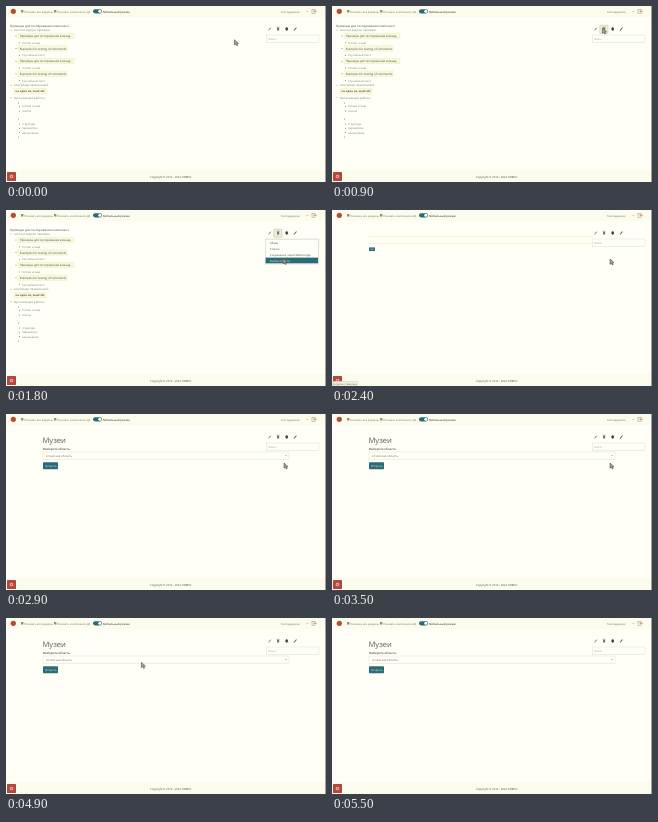
Animation of 320x176 px, one loop 5.7 s. Source, as an HTML page:

```html
<!DOCTYPE html>
<html lang="ru">
<head>
<meta charset="utf-8">
<title>Выбор области</title>
<style>
  html, body { margin: 0; width: 100%; height: 100%; overflow: hidden; background: #fffff8; }
  svg { display: block; width: 100vw; height: 100vh; }
  text { font-family: "Open Sans", "Noto Sans", sans-serif; text-rendering: geometricPrecision; }
</style>
</head>
<body>
<svg id="stage" viewBox="0 0 320 176"></svg>
<script>
const stage = document.getElementById('stage');
const INK = '#4c4c46', SOFT = '#74745f', GREEN = '#71886b', TEAL = '#2b6b76', EDGE = '#dedec2';
const PAPER = '#fffffa', BAND = '#fcfcee';

const text = (x, y, label, fill = INK, size = 2.9, weight = 400) =>
  `<text x="${x}" y="${y}" fill="${fill}" font-size="${size}" font-weight="${weight}">${label}</text>`;
const rect = (x, y, w, h, fill, stroke = 'none', rx = 0) =>
  `<rect x="${x}" y="${y}" width="${w}" height="${h}" rx="${rx}" fill="${fill}" stroke="${stroke}" stroke-width=".5"/>`;
const dot = (x, y, r, fill) => `<circle cx="${x}" cy="${y}" r="${r}" fill="${fill}"/>`;
const path = (d, stroke, width = .6, fill = 'none') =>
  `<path d="${d}" fill="${fill}" stroke="${stroke}" stroke-width="${width}"/>`;
const group = (id, content) => `<g id="${id}">${content}</g>`;

function header() {
  return rect(0, 0, 319, 11, BAND) + dot(7.3, 5.3, 2.6, '#b84b32') +
    rect(15, 4, 2.4, 2.5, '#8d9868') + text(18, 6.6, 'Показать все разделы', SOFT, 2.7) +
    rect(48, 4, 2.4, 2.5, '#8d9868') + text(51, 6.6, 'Показать компоненты ДЗ', SOFT, 2.7) +
    rect(87, 3.2, 9, 4.2, TEAL, 'none', 2.1) + dot(93.8, 5.3, 1.5, PAPER) +
    text(97, 6.6, 'Мобильный режим', INK, 2.7, 600) +
    text(275, 6.6, 'Техподдержка', SOFT, 2.7) + path('M300.5 5l.8.8.8-.8', SOFT, .4) +
    rect(306, 3.4, 3, 3.8, 'none', '#b5805a') + path('M307.5 5.3h3.2', '#b5805a', .8) +
    rect(319, 0, 1, 176, '#a2a298');
}

function footer() {
  return rect(0, 164, 319, 12, BAND) + rect(1, 166, 9, 9, '#b5473f', 'none', .6) +
    dot(5.5, 170.5, 1.8, '#e2b2a5') + dot(5.5, 170.5, .7, '#b5473f') +
    text(144, 171.8, 'Copyright © 2014 - 2024 ЛИВРО', INK, 2.75);
}

function outline() {
  const ru = 'Примеры для тестирования команд,', en = 'Examples for testing of commands';
  const samples = [[ru, 'Готово и ещё'], [en, 'Случайный текст'], [ru, 'Готово и ещё'], [en, 'Случайный текст']];
  const bullet = (y, label) => dot(13.5, y - 1, .5, SOFT) + text(16, y, label, GREEN, 2.8);
  const heading = (y, label) => path(`M4.3 ${y - 1.5}l.8.8.8-.8`, SOFT, .4) + text(8, y, label, GREEN, 2.95);
  const marked = (y, width, x = 12) => rect(x, y - 3.8, width, 5.4, '#f8f8df', '#efefb4');
  let out = text(4, 21.2, 'Примеры для тестирования компонент', '#66706b', 2.95, 600) +
    heading(25.2, 'контент внутри примера');
  samples.forEach(([title, note], i) => {
    const y = 31 + i * 12.6;
    out += marked(y, i % 2 ? 49 : 56) + dot(10, y - 1, .5, SOFT) +
      text(13.7, y, title, INK, 2.9) + bullet(y + 6.8, note);
  });
  out += heading(80.3, 'контейнер примечаний') +
    marked(86.4, 32, 8) + text(9.5, 86.3, 'на один из, занятий', INK, 2.85, 600) +
    heading(92.6, 'Организация работы') + bullet(101.2, 'Готово и ещё') + bullet(106, 'список');
  ['структура', 'параметры', 'назначение'].forEach((label, i) => out += bullet(119 + i * 4.3, label));
  [97, 113, 131].forEach(y => out += dot(12.5, y, .5, SOFT));
  return out;
}

function tools() {
  return rect(260.5, 29, 52.5, 7.6, PAPER, EDGE) + text(262, 34, 'Поиск', '#9b9b87', 2.7) +
    path('M262.7 24.3l2-2.6', '#65655a', .9) +
    rect(271, 21.8, 2.2, 2.7, '#777765') + path('M270.6 21.3h3', '#65655a', .5) +
    dot(280.7, 23, 1.4, '#44443e') + path('M280.7 21v4', '#44443e', .6) +
    path('M288 24.5l2.5-3', '#65655a', 1.1);
}

function form() {
  return text(36.5, 29.2, 'Музеи', '#5c5c50', 7.6) +
    text(37, 35.8, 'Выберите область:', INK, 2.9, 600) +
    rect(37, 38, 246, 7.2, PAPER, EDGE) + text(40, 42.7, 'Алтайская область', SOFT, 2.9) +
    path('M279.2 41l.8.8.8-.8', INK, .4) +
    rect(37, 48.2, 15, 7, TEAL, 'none', .7) + text(39, 52.7, 'Открыть', '#e5eee0', 2.75);
}

function loading() {
  return path('M37 26.5H260M37 33.5H284', '#f1f1bd', .7) +
    rect(37, 37.4, 6, 3.6, TEAL) + path('M38.3 39.2h3.4', '#c5d5c8', .6) +
    rect(0, 171.4, 25.5, 4.6, '#f0f0df', '#d0d0bd') +
    text(.8, 174.8, 'Загрузка страницы', SOFT, 2.55);
}

const choices = ['Абзац', 'Список', 'Сохранение через Webstorage', 'Выбор области'];
const rowTop = i => 30.5 + i * 5.7;
function menu() {
  return rect(259.3, 29.2, 53, 24.8, PAPER, '#c9c9b7') +
    `<rect id="choice" x="259.6" width="52.4" height="5.7" fill="${TEAL}"/>` +
    choices.map((label, i) => text(264, rowTop(i) + 3.9, label, INK, 2.75)).join('');
}

const pointer = path('M0 0V5.3L1.3 4.1 2.3 6 3.2 5.5 2.3 3.7H4Z', '#4d4d42', .6, '#a9a98a');
stage.innerHTML = header() + footer() + group('outline', outline()) + group('loading', loading()) +
  group('form', form()) +
  group('hover', rect(267.8, 19.2, 8.2, 8, '#eeeede', '#b8b8a5', .5)) +
  tools() + group('menu', menu()) + group('pointer', pointer);

const part = id => document.getElementById(id);
const show = (id, visible) => part(id).setAttribute('visibility', visible ? 'visible' : 'hidden');
const labels = [...part('menu').querySelectorAll('text')];

// Pointer stops: time, x, y.
const stops = [
  [0, 228.5, 33.8], [150, 228.5, 33.8], [800, 270.5, 22], [1250, 270.5, 22],
  [1700, 277, 48.5], [2100, 277.5, 48.8], [2300, 278, 49],
  [3600, 278, 49], [4250, 134, 49.3], [4800, 134, 49.3], [5350, 150, -7], [5700, 150, -7]
];

function pointerAt(time) {
  const next = Math.max(1, stops.findIndex(stop => stop[0] > time));
  const [t0, x0, y0] = stops[next - 1], [t1, x1, y1] = stops[next];
  const p = (time - t0) / (t1 - t0), eased = p * p * (3 - 2 * p);
  return [x0 + (x1 - x0) * eased, y0 + (y1 - y0) * eased];
}

function draw(now) {
  const time = Math.floor(now % 5700 / 100) * 100;
  const [x, y] = pointerAt(time);
  const row = Math.min(3, Math.floor((y - rowTop(0)) / 5.7));
  part('pointer').setAttribute('transform', `translate(${x} ${y})`);
  show('outline', time < 2100);
  show('loading', time >= 2100 && time < 2700);
  show('form', time >= 2700);
  show('hover', time >= 700 && time < 2100);
  show('menu', time >= 1200 && time < 2100);
  part('choice').setAttribute('y', rowTop(Math.max(0, row)));
  part('choice').setAttribute('opacity', row < 0 ? 0 : 1);
  labels.forEach((label, i) => label.setAttribute('fill', i === row ? '#eef3e5' : INK));
  requestAnimationFrame(() => draw(performance.now()));
}
draw(performance.now());
</script>
</body>
</html>
```
